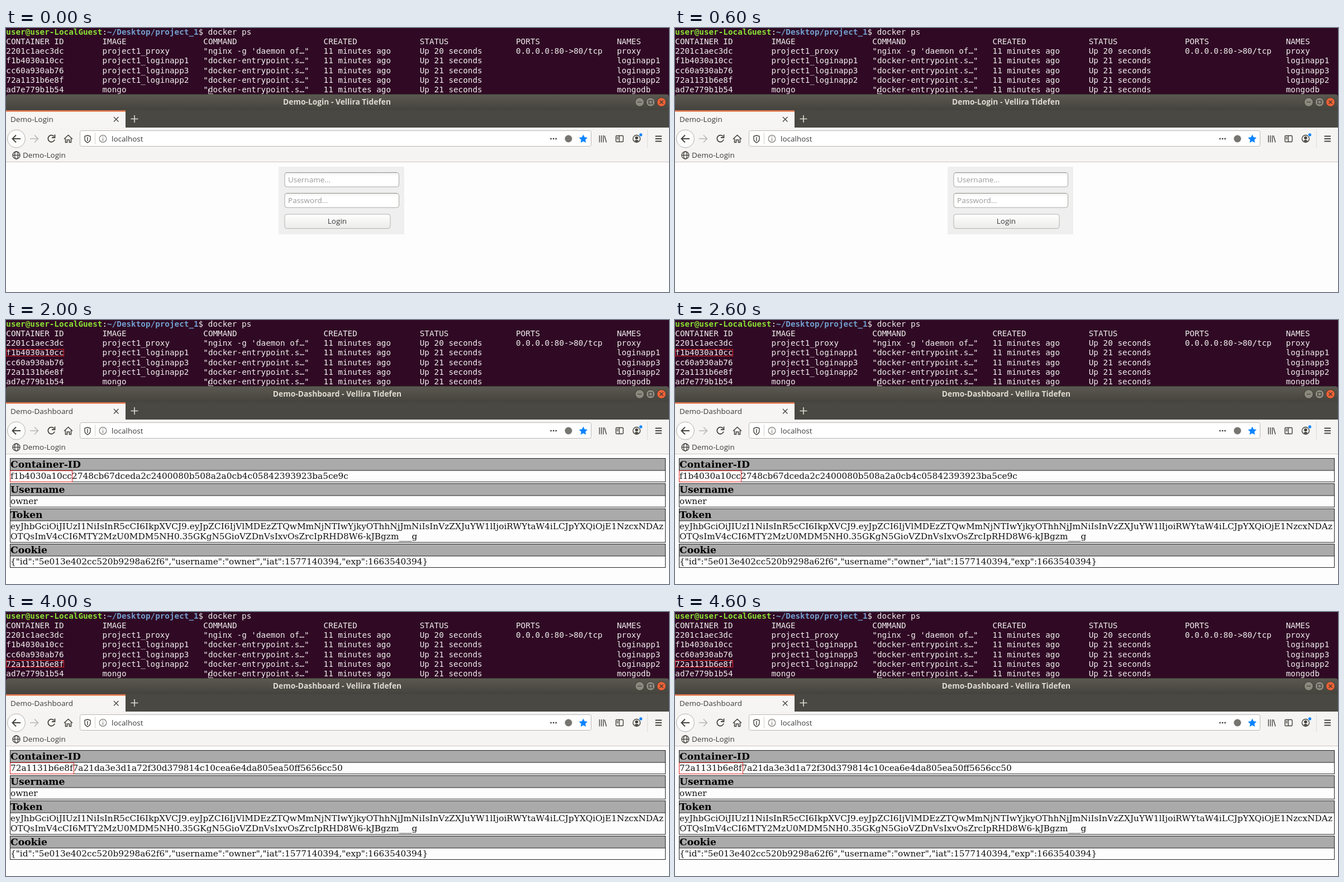
An HTML page that plays this animation: 1187x472 px, repeating every 5000 ms.

```html
<!DOCTYPE html>
<html lang="en">
<head>
<meta charset="utf-8">
<title>Login demo</title>
<style>
  html, body { margin: 0; width: 100%; height: 100%; overflow: hidden; background: #fdfdfd; }
  svg { display: block; width: 1187px; height: 472px; }
  text { white-space: pre; }
  .term { font: 14.3px "DejaVu Sans Mono", monospace; fill: #f0eeef; }
  .prompt { font-weight: bold; fill: #8ae234; }
  .path { font-weight: bold; fill: #729fcf; }
  .ui { font: 13.5px "Open Sans", sans-serif; fill: #3c3c3c; }
  .title { font: bold 13.8px "Open Sans", sans-serif; fill: #dfdbd2; text-anchor: middle; }
  .page { font: 15.32px "DejaVu Serif", serif; fill: #111; }
  .head { font-weight: bold; font-size: 17.2px; fill: #000; }
  .hint { fill: #999; }
  .icon { fill: none; stroke: #45443f; stroke-width: 1.4; }
  .mark { fill: none; stroke: #e02020; }
  .scene { animation: one 5s step-end infinite; animation-delay: calc(var(--at) * 1s - 5s); }
  .two { animation-name: two; }
  .three { animation-name: three; }
  @keyframes one { 0% { visibility: visible } 20%, 100% { visibility: hidden } }
  @keyframes two { 0% { visibility: visible } 40%, 100% { visibility: hidden } }
  @keyframes three { 0% { visibility: visible } 60%, 100% { visibility: hidden } }
</style>
</head>
<body>
<svg viewBox="0 0 1187 472">
  <defs>
    <linearGradient id="bar" x2="0" y2="1"><stop stop-color="#5b5951"/><stop offset="1" stop-color="#44423c"/></linearGradient>
    <linearGradient id="button" x2="0" y2="1"><stop stop-color="#fff"/><stop offset="1" stop-color="#ebebea"/></linearGradient>
    <linearGradient id="field" x2="0" y2="1"><stop stop-color="#f1f1f1"/><stop offset=".25" stop-color="#fff"/></linearGradient>
  </defs>

  <rect width="1187" height="472" fill="#fdfdfd"/>
  <rect width="1187" height="125" fill="#300a24"/>
  <g id="terminal" class="term"></g>
  <path d="M362.5 109V117.5H371" fill="none" stroke="#d8d0d5"/>

  <!-- window frame -->
  <path d="M0 148V124Q0 118 6 118H1181Q1187 118 1187 124V148Z" fill="url(#bar)"/>
  <path d="M4 118.5H1183" stroke="#35332f"/>
  <rect y="147" width="1187" height="31" fill="#4a4842"/>
  <g fill="#8b887e" stroke="#37352f">
    <circle cx="1134.5" cy="132.5" r="8"/><circle cx="1154" cy="132.5" r="8"/>
    <circle cx="1173.5" cy="132.5" r="8" fill="#ee6237"/>
    <path d="M1131 132.5H1138M1151 129.5H1157V135.5H1151ZM1170.5 129.5L1176.5 135.5M1176.5 129.5L1170.5 135.5" fill="none" stroke-width="1.2"/>
  </g>
  <rect y="147.5" width="214" height="31" fill="#f6f5f3"/>
  <rect y="147.5" width="214" height="2" fill="#e9622f"/>
  <path d="M193 159L201.5 167.5M201.5 159L193 167.5" class="icon"/>
  <path d="M223.5 162.5H236.5M230 156V169" fill="none" stroke="#dedbd3" stroke-width="1.6"/>

  <!-- toolbar -->
  <rect y="178" width="1187" height="61" fill="#f5f4f2"/>
  <path d="M0 239.5H1187" stroke="#c9c7c4"/>
  <circle cx="18.5" cy="198" r="16" fill="#fcfcfc" stroke="#b3b1ae"/>
  <rect x="132.5" y="183.5" width="915" height="28" rx="3" fill="#fff" stroke="#b9b7b4"/>
  <g class="icon">
    <path d="M26 198H12M18 191.5L11.5 198L18 204.5" stroke-width="1.9"/>
    <path d="M43 198H57M51 191.5L57.5 198L51 204.5" stroke="#b9b7b4" stroke-width="1.6"/>
    <path d="M86 194A6 6 0 1 0 87 199.5M87.5 190.5V196H82" stroke-width="1.8"/>
    <path d="M104 198.5L111.5 191.5L119 198.5M106.5 197.5V204.5H109.5V200H113.5V204.5H116.5V197.5" stroke-width="1.6"/>
    <path d="M146 192L151 193.5V198Q151 203 146 205Q141 203 141 198V193.5ZM146 195V202"/>
    <path d="M159.5 187V208" stroke="#d2d0cd" stroke-width="1"/>
    <g stroke="#7c7a75" stroke-width="1.2"><circle cx="173.5" cy="198" r="6.3"/><path d="M173.5 197V202M173.5 194V195.5"/></g>
    <path d="M974.5 198H977M979 198H981.5M983.5 198H986" stroke-width="2.5"/>
    <path d="M1062.5 192V204.5M1066 192V204.5M1069.5 192V204.5M1071.5 192.5L1075 204.5"/>
    <rect x="1092" y="192.5" width="13" height="11" rx="1.5"/>
    <path d="M1098 193V203M1093.5 195.5H1096.5M1093.5 198H1096.5"/>
    <circle cx="1129" cy="198" r="6.5"/>
    <path d="M1162.5 193.5H1174M1162.5 198H1174M1162.5 202.5H1174" stroke-width="1.8"/>
    <path d="M1148.5 182V214" stroke="#dddbd8" stroke-width="1"/>
    <circle cx="18.5" cy="227.5" r="6.5"/>
    <ellipse cx="18.5" cy="227.5" rx="3" ry="6.5"/><path d="M12 227.5H25"/>
  </g>
  <circle cx="1007" cy="198" r="6.5" fill="#777570"/>
  <path id="star" fill="#0a84ff"/>
  <path d="M1125 202Q1129 198 1133 202L1129 204Z" fill="#45443f"/>
  <circle cx="1129" cy="196.5" r="2.8" fill="#45443f"/>
  <circle cx="1136.5" cy="191" r="3.2" fill="#0a84ff" stroke="#f5f4f2"/>
  <text class="ui" x="189" y="203">localhost</text>
  <text class="ui" x="30" y="232">Demo-Login</text>

  <g class="scene two" style="--at:0">
    <text class="title" x="592.5" y="137">Demo-Login - Vellira Tidefen</text>
    <text class="ui" x="8" y="168">Demo-Login</text>
    <rect x="488" y="248" width="225" height="121" fill="#efefef"/>
    <rect x="499" y="333" width="189" height="25.5" rx="4" fill="url(#button)" stroke="#b5b2ae"/>
    <text class="ui" x="593" y="350" text-anchor="middle">Login</text>
  </g>
  <g id="empty" class="scene ui" style="--at:0"></g>
  <g id="filled" class="scene ui" style="--at:1"></g>
  <g id="dashboard" class="scene three page" style="--at:2">
    <text class="title" x="593" y="137">Demo-Dashboard - Vellira Tidefen</text>
    <text class="ui" x="8" y="168">Demo-Dashboard</text>
  </g>
  <g id="containers" class="page"></g>
</svg>

<script>
  const add = (id, markup) => document.getElementById(id).insertAdjacentHTML('beforeend', markup);
  const text = (x, y, content, cls = '') => `<text x="${x}" y="${y}" class="${cls}">${content}</text>`;
  const rect = (x, y, w, h, attrs) => `<rect x="${x}" y="${y}" width="${w}" height="${h}" ${attrs}/>`;

  // terminal
  const charWidth = 8.61, rowHeight = 17.2;
  const columns = [0, 20, 41, 66, 86, 106, 127];
  const entry = '"docker-entrypoint.s…"', age = '11 minutes ago', up = 'Up 21 seconds';
  const rows = [
    ['CONTAINER ID', 'IMAGE', 'COMMAND', 'CREATED', 'STATUS', 'PORTS', 'NAMES'],
    ['2201c1aec3dc', 'project1_proxy', '"nginx -g \'daemon of…"', age, 'Up 20 seconds', '0.0.0.0:80-&gt;80/tcp', 'proxy'],
    ['f1b4030a10cc', 'project1_loginapp1', entry, age, up, '', 'loginapp1'],
    ['cc60a930ab76', 'project1_loginapp3', entry, age, up, '', 'loginapp3'],
    ['72a1131b6e8f', 'project1_loginapp2', entry, age, up, '', 'loginapp2'],
    ['ad7e779b1b54', 'mongo', entry, age, up, '', 'mongodb']
  ];
  add('terminal',
    text(0.3, 11.8, '<tspan class="prompt">user@user-LocalGuest</tspan>:<tspan class="path">~/Desktop/project_1</tspan>$ docker ps') +
    rows.map((row, r) => row.map((cell, c) =>
      text(0.3 + columns[c] * charWidth, 29 + r * rowHeight, cell)).join('')).join(''));

  // bookmark star
  const points = Array.from({ length: 10 }, (_, i) => {
    const radius = i % 2 ? 4 : 8, angle = (i / 5 - 0.5) * Math.PI;
    return [1033.5 + radius * Math.cos(angle), 198.5 + radius * Math.sin(angle)];
  });
  document.getElementById('star').setAttribute('d', `M${points.join('L')}Z`);

  // login form
  const field = (y, fill) => rect(499, y, 204.5, 25.5, `rx="4" fill="${fill}" stroke="#aaa7a2"`) +
    `<path d="M502 ${y}H700" stroke="#8f8c87"/>`;
  add('empty', field(258.5, 'url(#field)') + text(505, 276, 'Username...', 'hint') +
    field(295.5, 'url(#field)') + text(505, 313, 'Password...', 'hint'));
  const dots = Array.from({ length: 6 }, (_, i) =>
    `<circle cx="${507.7 + i * 5.2}" cy="308.5" r="2.1"/>`).join('');
  add('filled', field(258.5, '#fdf8c4') + text(505, 276, 'owner') + field(295.5, '#fdf8c4') + dots);

  // dashboard
  const section = (y, height, heading, ...lines) =>
    rect(7.5, y, 1173, height, 'fill="#fdfdfd" stroke="#222"') +
    rect(7.5, y, 1173, 21.5, 'fill="#aaa" stroke="#222"') +
    text(8, y + 16.5, heading, 'head') +
    lines.map((line, i) => text(8, y + 36.5 + i * 18, line)).join('');
  add('dashboard',
    section(247.5, 42, 'Container-ID') +
    section(292.5, 42, 'Username', 'owner') +
    section(337.5, 60, 'Token',
      'eyJhbGciOiJIUzI1NiIsInR5cCI6IkpXVCJ9.eyJpZCI6IjVlMDEzZTQwMmNjNTIwYjkyOThhNjJmNiIsInVzZXJuYW1lIjoiRWYtaW4iLCJpYXQiOjE1NzcxNDAz',
      'OTQsImV4cCI6MTY2MzU0MDM5NH0.35GKgN5GioVZDnVsIxvOsZrcIpRHD8W6-kJBgzm___g') +
    section(400.5, 42, 'Cookie', '{"id":"5e013e402cc520b9298a62f6","username":"owner","iat":1577140394,"exp":1663540394}'));

  // the container that answers each request
  const answers = [
    ['2748cb67dceda2c2400080b508a2a0cb4c05842393923ba5ce9c', 111],
    ['544f3593c0717f21bc44166649b91ab2b4473a146f81b4b05869', 114],
    ['7a21da3e3d1a72f30d379814c10cea6e4da805ea50ff5656cc50', 114]
  ];
  add('containers', answers.map(([rest, width], i) =>
    `<g class="scene" style="--at:${i + 2}">` +
    text(8, 284, rows[i + 2][0] + rest) +
    rect(0.5, 52.5 + Math.round(i * rowHeight), 103, 12, 'class="mark"') +
    rect(7.5, 269.5, width, 20, 'class="mark"') + '</g>').join(''));
</script>
</body>
</html>
```
